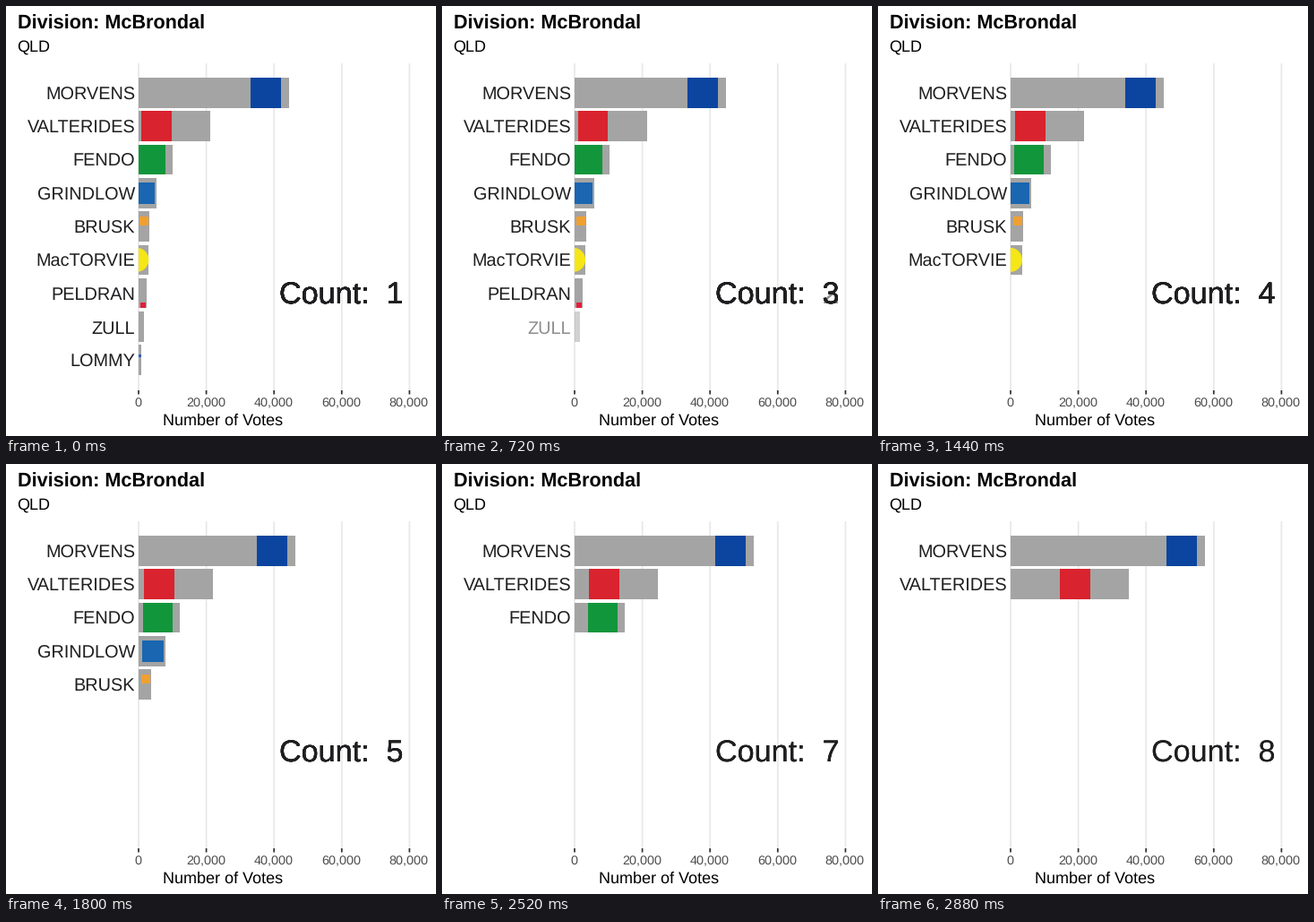
A matplotlib script for the animation above (3000 ms loop, 480 by 480 pixels).

```python
import matplotlib.pyplot as plt
from matplotlib.animation import FuncAnimation
from matplotlib.patches import Circle, Rectangle

SIZE, DPI = 480, 100
FRAMES, INTERVAL = 25, 120
ZERO, PER_K = 148, 3.78            # x of zero, pixels per thousand votes
TOP, BOTTOM = 64, 429
FIRST, PITCH, BAR = 96.95, 37.28, 33.55
INK, GREY = "#1f1f21", "#a4a4a4"

NAMES = ["MORVENS", "VALTERIDES", "FENDO", "GRINDLOW", "BRUSK",
         "MacTORVIE", "PELDRAN", "ZULL", "LOMMY"]

# Thousands of votes per count; the last candidate drops out each time.
VOTES = [
    [44.5, 21.2, 10.1, 5.4, 3.2, 3.0, 2.4, 1.6, 0.8],
    [44.6, 21.2, 10.2, 5.6, 3.3, 3.1, 2.4, 1.65],
    [44.8, 21.4, 10.5, 6.1, 3.55, 3.3, 2.55],
    [45.2, 21.7, 11.9, 6.2, 3.7, 3.45],
    [46.3, 22.0, 12.2, 7.95, 3.75],
    [48.2, 22.8, 13.0, 8.75],
    [52.9, 24.6, 14.8],
    [57.4, 34.9],
]
KEYS = [0, 4, 8, 12, 15, 18, 21, 24]

# Party marks: shape, colour, size, offset of centre from bar end and row.
MARKS = [
    ("square", "#0b459f", 33.5, -26, 0),
    ("square", "#d9232e", 33.5, -60, 0),
    ("square", "#12963b", 33.5, -24.5, 0),
    ("square", "#1a66b0", 24, -14, 0),
    ("square", "#f0a030", 10, -6, -6),
    ("circle", "#f5e616", 27, -13.5, 0),
    ("square", "#e0203a", 6, -4, 13.5),
    None,
    ("square", "#2a5cb8", 3, -1.5, -5),
]

plt.rcParams["font.family"] = "Liberation Sans"
plt.rcParams["text.hinting"] = "none"

fig = plt.figure(figsize=(SIZE / DPI, SIZE / DPI), dpi=DPI, facecolor="white")
ax = fig.add_axes([0, 0, 1, 1])
ax.set_xlim(0, SIZE)
ax.set_ylim(SIZE, 0)
ax.axis("off")


def label(x, y, text, px, color="black", ha="left", weight="normal", z=5):
    return ax.text(x, y, text, fontsize=px * 72 / DPI, color=color, ha=ha,
                   va="baseline", weight=weight, zorder=z)


def vline(x, y0, y1, color):
    ax.plot([x, x], [y0, y1], color=color, lw=1.75 * 72 / DPI,
            solid_capstyle="butt", zorder=1, snap=False)


def row_y(i):
    return FIRST + PITCH * i


def make_mark(spec):
    if spec is None:
        return None
    shape, color, size = spec[:3]
    if shape == "circle":
        patch = Circle((0, 0), size / 2, fc=color, lw=0, zorder=3)
    else:
        patch = Rectangle((0, 0), size, size, fc=color, lw=0, zorder=3)
    ax.add_patch(patch)
    patch.set_clip_path(Rectangle((ZERO, 0), SIZE - ZERO, SIZE,
                                  transform=ax.transData))
    return patch


def place_mark(patch, spec, end, y):
    shape, _, size, dx, dy = spec
    cx, cy = end + dx, y + dy
    if shape == "circle":
        patch.center = (cx, cy)
    else:
        patch.set_xy((cx - size / 2, cy - size / 2))


label(12.8, 26, "Division: McBrondal", 21.6, weight="bold")
label(12, 51, "QLD", 18)
label(242, 468, "Number of Votes", 18, ha="center")
for k in range(0, 81, 20):
    x = ZERO + k * PER_K
    vline(x, TOP, BOTTOM, "#e8e8e8")
    vline(x, BOTTOM, BOTTOM + 4.5, "#333333")
    label(x - 0.8, 447, f"{k * 1000:,}", 14.4, "#4d4d4d", "center")

bars, marks, tags, counts = [], [], [], []
for i, name in enumerate(NAMES):
    bar = Rectangle((ZERO, row_y(i) - BAR / 2), 0, BAR, fc=GREY, lw=0, zorder=2)
    bars.append(ax.add_patch(bar))
    marks.append(make_mark(MARKS[i]))
    tags.append(label(144.2, row_y(i) + 7.7, name, 19.9, INK, "right"))
    counts.append(label(374, 333, "", 34.15, INK, "center", z=6))


def state_at(frame):
    """Index of the current count and progress towards the next one."""
    s = max(j for j, key in enumerate(KEYS) if key <= frame)
    if s == len(KEYS) - 1:
        return s, 0.0
    return s, (frame - KEYS[s]) / (KEYS[s + 1] - KEYS[s])


def update(frame):
    s, p = state_at(frame)
    now = VOTES[s]
    after = VOTES[min(s + 1, len(VOTES) - 1)]
    for i in range(len(NAMES)):
        parts = [a for a in (bars[i], marks[i], tags[i], counts[i]) if a]
        shown = i < len(now)
        for part in parts:
            part.set_visible(shown)
        if not shown:
            continue
        stays = i < len(after)
        votes = now[i] + (after[i] - now[i]) * p if stays else now[i]
        width = votes * PER_K
        bars[i].set_width(width)
        if marks[i]:
            place_mark(marks[i], MARKS[i], ZERO + width, row_y(i))
        # Each candidate carries its own copy of the counter.
        number = s + 2 if stays and p >= 0.5 else s + 1
        counts[i].set_text(f"Count:  {number}")
        for part in parts:
            part.set_alpha(1 if stays else 1 - p)
    return bars + [m for m in marks if m] + tags + counts


anim = FuncAnimation(fig, update, frames=FRAMES, interval=INTERVAL,
                     repeat=True, repeat_delay=0, blit=False)
plt.show()
```
